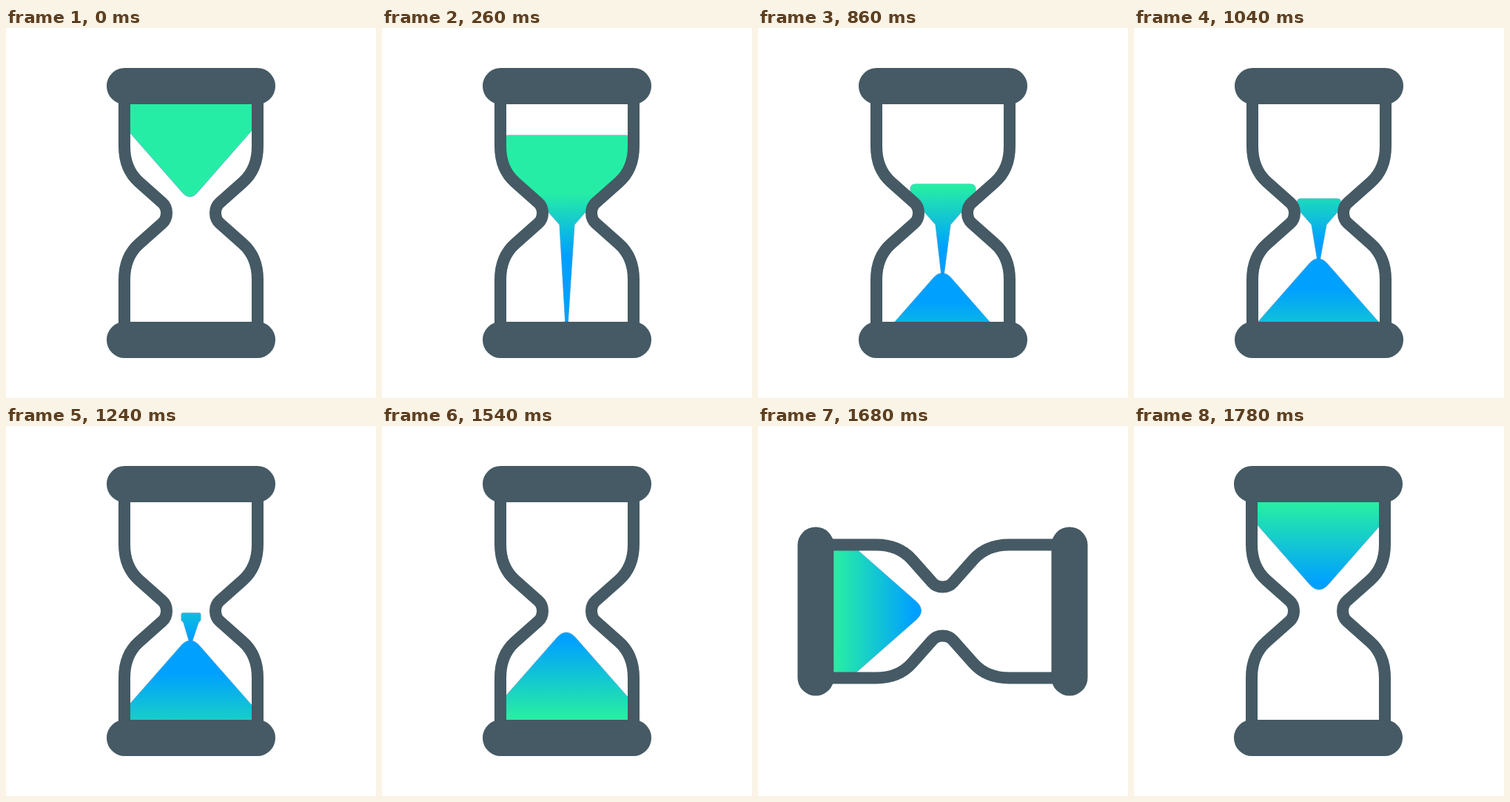
Write an HTML page with a canvas that moves like this. It is 500 by 500 pixels and loops after 1.8 s.

```html
<!DOCTYPE html>
<html lang="en">
<head>
<meta charset="utf-8">
<title>Hourglass</title>
<style>
  html, body { margin: 0; width: 100%; height: 100%; overflow: hidden; background: #fff; }
  canvas { display: block; width: 500px; height: 500px; }
</style>
</head>
<body>
<canvas id="stage" width="500" height="500"></canvas>
<script>
const ctx = document.getElementById('stage').getContext('2d');

const LOOP = 1800, STEP = 20;
const DROP_END = 260, TURN_START = 1580, TURN_TIME = 200;
const PIVOT_X = 249.5, PIVOT_Y = 250;
const SLOPE = 1.14;          // steepness of the sand's sides
const GREEN = '#26eda5', BLUE = '#00a0ff', STEEL = '#455a64';

const clamp = (v, lo, hi) => Math.min(hi, Math.max(lo, v));
const lerp = (a, b, p) => a + (b - a) * p;

// Interpolates through [time, value] points.
function track(points, t) {
  if (t <= points[0][0]) return points[0][1];
  for (let i = 1; i < points.length; i++) {
    const [t0, v0] = points[i - 1], [t1, v1] = points[i];
    if (t <= t1) return lerp(v0, v1, (t - t0) / (t1 - t0));
  }
  return points[points.length - 1][1];
}

const leftWall = new Path2D('M160 95 V160 C160 182 167 197 180 208.5 L211 236' +
  ' C219 243 219 257 211 264 L180 291.5 C167 303 160 318 160 340 V405');
const rightWall = new Path2D();
rightWall.addPath(leftWall, new DOMMatrix([-1, 0, 0, 1, 500, 0]));

const bulb = new Path2D('M160 103 V160 C160 182 167 197 180 208.5 L211 236' +
  ' C219 243 219 257 211 264 L180 291.5 C167 303 160 318 160 340 V397' +
  ' H340 V340 C340 318 333 303 320 291.5 L289 264 C281 257 281 243 289 236' +
  ' L320 208.5 C333 197 340 182 340 160 V103 Z');

const caps = new Path2D();
caps.roundRect(136, 54, 228, 49, 24.4);
caps.roundRect(136, 397, 228, 49, 24.4);

function fillSand(path, greenY, blueY) {
  const g = ctx.createLinearGradient(0, greenY, 0, blueY);
  g.addColorStop(0, GREEN);
  g.addColorStop(1, BLUE);
  ctx.strokeStyle = 'rgba(10, 115, 185, 0.6)';
  ctx.lineWidth = 1.2;
  ctx.stroke(path);
  ctx.fillStyle = g;
  ctx.fill(path);
}

const pileTip = t => Math.max(279, 364 - 0.109 * (t - 560));

function drawPile(t) {
  const cx = 249, apex = pileTip(t) - 7, base = 420;
  const half = (base - apex) / SLOPE, nose = 12.5;
  const p = new Path2D();
  p.moveTo(cx - half, base);
  p.lineTo(cx - nose, apex + nose * SLOPE);
  p.quadraticCurveTo(cx, apex, cx + nose, apex + nose * SLOPE);
  p.lineTo(cx + half, base);
  p.closePath();
  const blueY = track([[260, 397], [560, 387], [860, 370], [1240, 334], [1540, 288]], t);
  fillSand(p, blueY + 105, blueY);
}

function drawUpper(t) {
  const half = Math.min(95, 68.5 - 0.0817 * (t - 560));
  if (half < 0.5) return;
  const drop = clamp(t / DROP_END, 0, 1);
  const cx = lerp(248.5, 250, drop);
  const apex = lerp(233.5, 277, drop);
  const top = drop < 1 ? lerp(101, 145, drop) : 178 + 0.11 * (t - 560);
  const r = half * 0.16;
  const neck = Math.min(10, half);
  const sideY = Math.max(top + r, apex - SLOPE * half);
  const neckY = Math.max(sideY, apex - SLOPE * neck);

  const p = new Path2D();
  p.moveTo(cx - half + r, top);
  p.lineTo(cx + half - r, top);
  p.quadraticCurveTo(cx + half, top, cx + half, top + r);
  p.lineTo(cx + half, sideY);
  p.lineTo(cx + neck, neckY);
  if (t > 0) {
    const end = drop < 1 ? lerp(228, 399, drop) : pileTip(t) + 2;
    const tip = Math.min(1.7, neck);
    p.lineTo(cx - 0.5 + tip, Math.max(end, neckY));
    p.lineTo(cx - 0.5 - tip, Math.max(end, neckY));
    p.lineTo(cx - neck, neckY);
  } else {
    p.quadraticCurveTo(cx, apex, cx - neck, neckY);
  }
  p.lineTo(cx - half, sideY);
  p.lineTo(cx - half, top + r);
  p.quadraticCurveTo(cx - half, top, cx - half + r, top);
  p.closePath();
  const greenY = 224 - 0.03 * Math.max(0, t - 560);
  fillSand(p, greenY, greenY + 82);
}

function draw(t) {
  ctx.fillStyle = '#fff';
  ctx.fillRect(0, 0, 500, 500);
  const p = clamp((t - TURN_START) / TURN_TIME, 0, 1);

  ctx.save();
  ctx.translate(PIVOT_X, PIVOT_Y);
  ctx.rotate(Math.PI * p * p * (3 - 2 * p));
  ctx.translate(-PIVOT_X, -PIVOT_Y);

  ctx.save();
  ctx.clip(bulb);
  drawUpper(t);
  if (t >= DROP_END) drawPile(t);
  ctx.restore();

  ctx.strokeStyle = STEEL;
  ctx.lineWidth = 16;
  ctx.lineJoin = 'round';
  ctx.stroke(leftWall);
  ctx.stroke(rightWall);
  ctx.fillStyle = STEEL;
  ctx.fill(caps);
  ctx.restore();
}

function tick() {
  const t = performance.now() % LOOP;
  draw(Math.floor(t / STEP) * STEP);
  requestAnimationFrame(tick);
}
tick();
</script>
</body>
</html>
```
